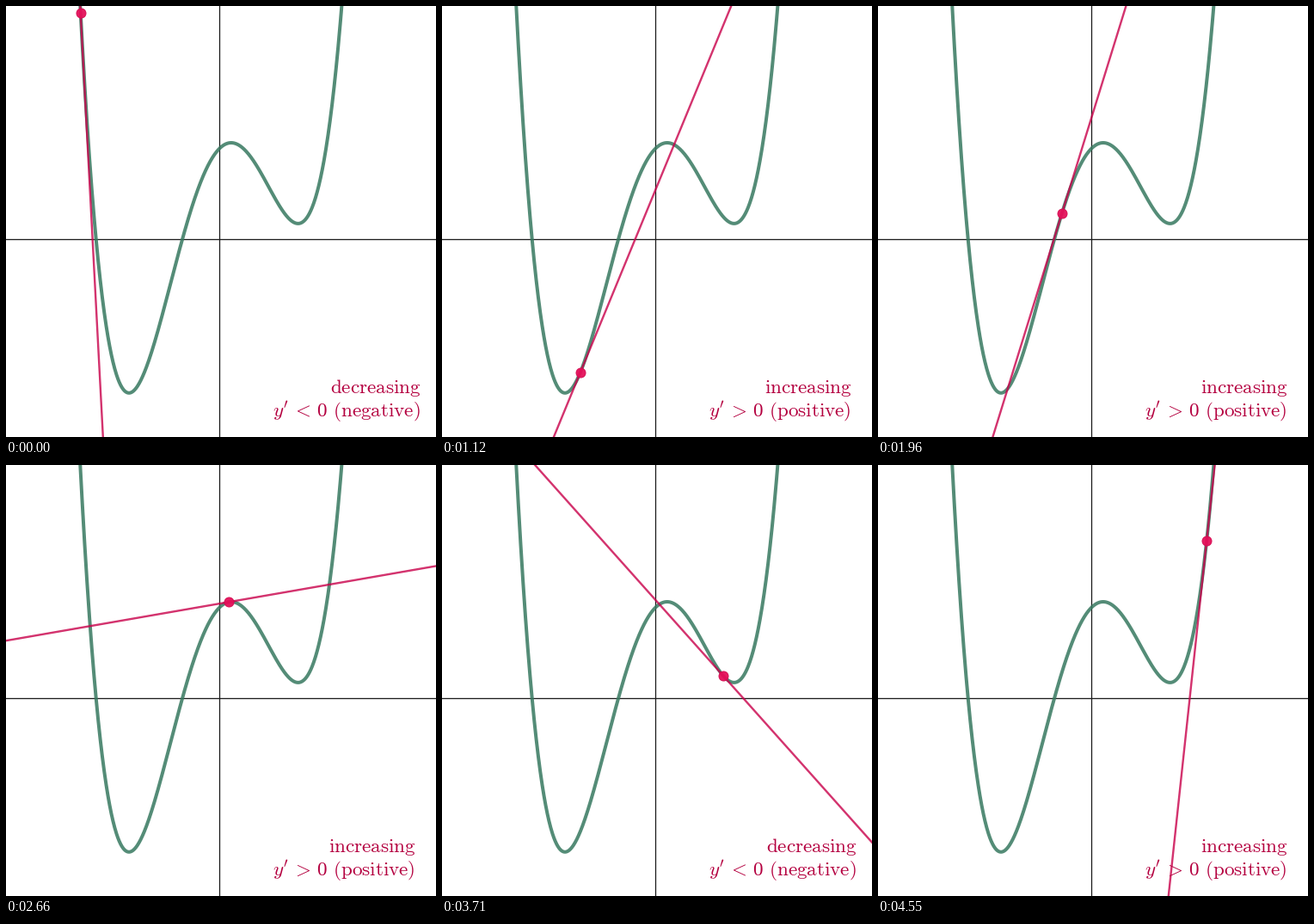
These frames come from a looping animation (500x501 px, 4620 ms). A matplotlib script:

```python
import numpy as np
import matplotlib.pyplot as plt
from matplotlib.animation import FuncAnimation

W, H, DPI = 500, 501, 64
PT = 72 / DPI  # points per pixel
FRAMES, INTERVAL = 66, 70

plt.rcParams["mathtext.fontset"] = "cm"

GREEN, CRIMSON, TEXT = "#36785f", "#c9004a", "#b4003f"

# Quartic in pixel coordinates, defined by its three turning points.
LEFT_MIN, PEAK, RIGHT_MIN = 143.0, 261.8, 339.6
BOTTOM, SCALE = 449.8, 7.585e-6
derivative = np.poly1d([0, PEAK - LEFT_MIN, RIGHT_MIN - LEFT_MIN], r=True) * SCALE
rise = derivative.integ()

# Key positions of the moving point along x.
KEY_FRAMES = [0, 8, 16, 28, 38, 53, 65]
KEY_X = [86.7, 122.9, 160.7, 214.0, 259.35, 327.4, 382.2]


def curve(x):
    return BOTTOM - rise(x - LEFT_MIN)


def slope(x):
    return derivative(x - LEFT_MIN)


def label(sign, word):
    return (rf"$y'\hspace{{0.21}}{sign}\hspace{{0.12}}0"
            rf"\hspace{{0.36}}\mathrm{{({word})}}$")


fig = plt.figure(figsize=(W / DPI, H / DPI), dpi=DPI, facecolor="white")
ax = fig.add_axes([0, 0, 1, 1])
ax.set_xlim(0, W)
ax.set_ylim(H, 0)
ax.axis("off")

ax.plot([0, W], [271, 271], color="#1c1c1c", lw=1.3 * PT)
ax.plot([248.4, 248.4], [0, H], color="#1c1c1c", lw=1.3 * PT)

xs = np.linspace(82, 396, 800)
ax.plot(xs, curve(xs), color=GREEN, alpha=0.85, lw=4 * PT)

text_style = dict(color=TEXT, fontsize=23.1 * PT, ha="right", va="baseline")
trend = ax.text(0, 450.1, "", **text_style)
detail = ax.text(0, 477.9, "", **text_style)

tangent, = ax.plot([], [], color=CRIMSON, alpha=0.8, lw=2.4 * PT)
point, = ax.plot([], [], "o", color="#e4105a", ms=11 * PT,
                 mec="#d60c52", mew=1 * PT, alpha=0.95)


def update(frame):
    x = np.interp(frame, KEY_FRAMES, KEY_X)
    y, m = curve(x), slope(x)
    ends = np.array([x - 600, x + 600])
    tangent.set_data(ends, y - m * (ends - x))
    point.set_data([x], [y])
    if m < 0:
        trend.set_text(r"$\mathrm{decreasing}$")
        detail.set_text(label("<", "negative"))
        right = 482.7
    else:
        trend.set_text(r"$\mathrm{increasing}$")
        detail.set_text(label(">", "positive"))
        right = 476.7
    trend.set_x(right)
    detail.set_x(right - 1)
    return tangent, point, trend, detail


anim = FuncAnimation(fig, update, frames=FRAMES, interval=INTERVAL,
                     repeat=True, repeat_delay=0)
plt.show()
```
